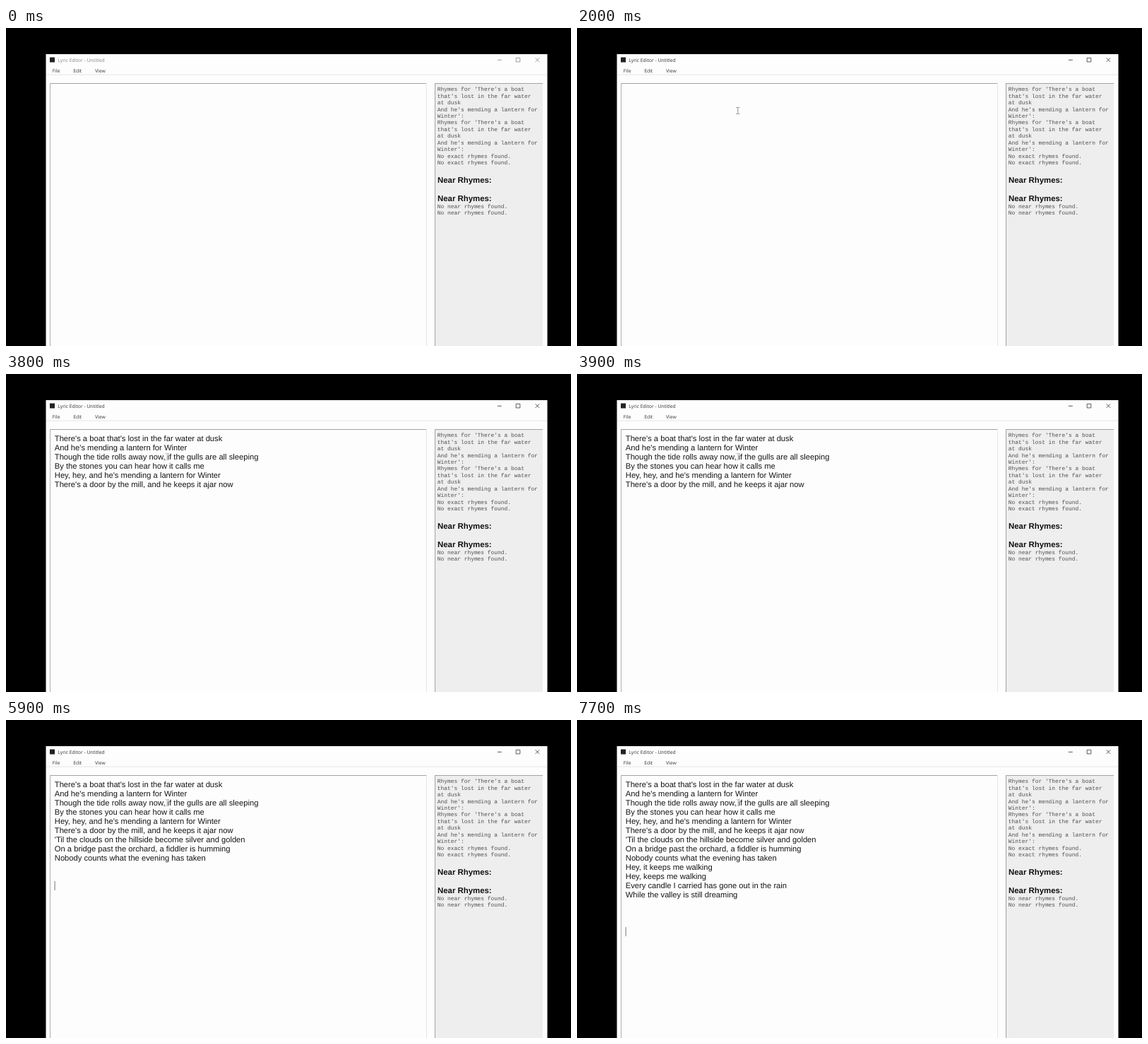
These frames come from a looping animation (800x450 px, 8000 ms). An HTML page:

```html
<!DOCTYPE html>
<html lang="en">
<head>
<meta charset="utf-8">
<title>Lyric Editor</title>
<style>
  html, body { margin: 0; width: 100%; height: 100%; overflow: hidden; background: #000; }
  svg { display: block; width: 800px; height: 450px; text-rendering: geometricPrecision; }
  .ui { font: 6.8px "Open Sans", "Noto Sans", sans-serif; }
  .lyric { font: 11.2px "Liberation Sans", Arial, sans-serif; fill: #161616; }
  .mono { font: 7.9px "Liberation Mono", "Courier New", monospace; fill: #505050; white-space: pre; }
  .head { font: bold 11.4px "Liberation Sans", Arial, sans-serif; fill: #111; }
  .icon { fill: none; stroke-width: .8; }
</style>
</head>
<body>
<svg viewBox="0 0 800 450">
  <rect width="800" height="450" fill="#000"/>
  <rect x="56.5" y="37" width="710" height="413" fill="#fefdfe"/>
  <rect x="57" y="65.6" width="709" height="1" fill="#e6e6e6"/>
  <rect x="62" y="41.5" width="7" height="7" fill="#222"/>

  <g id="chrome" class="ui">
    <text x="73.3" y="47.9">Lyric Editor - Untitled</text>
    <path class="icon" d="M695.8 45.3h6M722.2 42.3h5.6v5.6h-5.6zM749.6 42.3l5.6 5.6M755.2 42.3l-5.6 5.6"/>
  </g>
  <g class="ui" fill="#3c3c3c">
    <text x="65.8" y="62.8">File</text>
    <text x="95.2" y="62.8">Edit</text>
    <text x="126" y="62.8">View</text>
  </g>

  <rect x="62" y="78" width="533.5" height="1" fill="#a3a3a3"/>
  <rect x="62" y="78" width="1" height="372" fill="#b4adae"/>
  <rect x="595" y="78" width="1" height="372" fill="#e5e5e5"/>

  <rect x="607" y="78" width="153" height="372" fill="#eee"/>
  <rect x="607" y="78" width="153" height="1" fill="#a3a3a3"/>
  <rect x="607" y="78" width="1" height="372" fill="#a3a3a3"/>
  <g id="panel"></g>

  <g id="lyrics"></g>
  <path id="pointer" class="icon" stroke="#777" d="M225.2 112.4h1.8l.8.6.8-.6h1.8M227.8 113v8M225.2 121.6h1.8l.8-.6.8.6h1.8"/>
  <rect id="caret" x="68.6" width="1" height="13" fill="#777"/>
</svg>
<script>
const LOOP = 8000, FOCUS = 400, TOP = 85, STEP = 13;

const lyrics = [
  "There's a boat that's lost in the far water at dusk",
  "And he's mending a lantern for Winter",
  "Though the tide rolls away now, if the gulls are all sleeping",
  "By the stones you can hear how it calls me",
  "Hey, hey, and he's mending a lantern for Winter",
  "There's a door by the mill, and he keeps it ajar now",
  "'Til the clouds on the hillside become silver and golden",
  "On a bridge past the orchard, a fiddler is humming",
  "Nobody counts what the evening has taken",
  "Hey, it keeps me walking",
  "Hey, keeps me walking",
  "Every candle I carried has gone out in the rain",
  "While the valley is still dreaming"
];

// each paste: time, lines now visible, row of the caret
const pastes = [
  [0, 0, 0], [2700, 3, 6], [3800, 6, 9],
  [5100, 9, 11], [6300, 11, 13], [7300, 13, 16]
];

// times at which the caret turns on and off
const blinks = [
  [400, 1000], [1300, 1900], [2200, 2800], [3100, 3800], [4100, 4700],
  [5000, 5600], [5900, 6500], [6800, 7400], [7700, 8000]
];

const $ = id => document.getElementById(id);

function addText(parent, cls, x, y, str) {
  const el = document.createElementNS("http://www.w3.org/2000/svg", "text");
  el.setAttribute("class", cls);
  el.setAttribute("x", x);
  el.setAttribute("y", y);
  el.textContent = str;
  parent.append(el);
  return el;
}

function show(el, on) {
  el.setAttribute("visibility", on ? "visible" : "hidden");
}

const query = [
  "Rhymes for 'There's a boat",
  "that's lost in the far water",
  "at dusk",
  "And he's mending a lantern for",
  "Winter':"
];
const miss = kind => Array(2).fill(`No ${kind} rhymes found.`);
const mono = (rows, y) => rows.forEach((s, i) => addText($("panel"), "mono", 610.8, y + i * 9.45, s));

mono([...query, ...query, ...miss("exact")], 89.2);
for (const y of [219, 245]) addText($("panel"), "head", 611, y, "Near Rhymes:");
mono(miss("near"), 254.8);

const rows = lyrics.map((s, i) => addText($("lyrics"), "lyric", 68.8, TOP + 10.3 + i * STEP, s));

function draw(t) {
  const focused = t >= FOCUS;
  const [, count, row] = pastes.filter(p => t >= p[0]).pop();
  $("chrome").setAttribute("fill", focused ? "#333" : "#858585");
  $("chrome").setAttribute("stroke", "none");
  document.querySelector("#chrome path").setAttribute("stroke", focused ? "#333" : "#858585");
  rows.forEach((el, i) => show(el, i < count));
  show($("caret"), blinks.some(([on, off]) => t >= on && t < off));
  $("caret").setAttribute("y", TOP + row * STEP);
  show($("pointer"), focused);
  $("pointer").setAttribute("opacity", count ? .5 : 1);
}

const start = performance.now();
function frame() {
  draw((performance.now() - start) % LOOP);
  requestAnimationFrame(frame);
}
draw(0);
requestAnimationFrame(frame);
</script>
</body>
</html>
```
